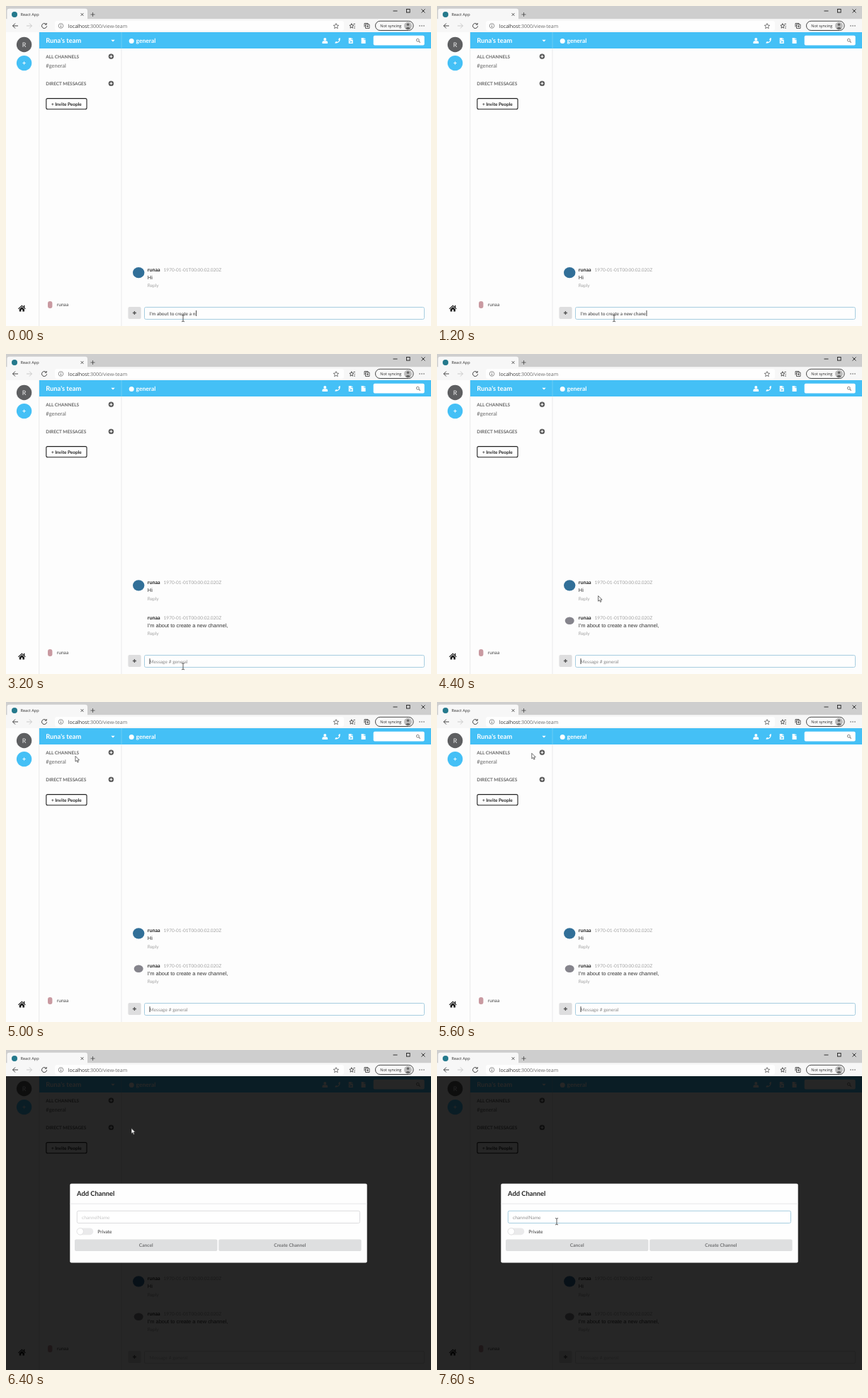
Animation of 600x452 px, one loop 8 s. Source, as an HTML page with a canvas:

```html
<!DOCTYPE html>
<html lang="en">
<head>
<meta charset="utf-8">
<title>Team chat</title>
<style>
html, body { margin: 0; width: 100%; height: 100%; overflow: hidden; background: #fdfdfd; }
canvas { display: block; width: 600px; height: 452px; }
</style>
</head>
<body>
<canvas id="stage" width="600" height="452"></canvas>
<script>
const ctx = document.getElementById('stage').getContext('2d');
const LOOP = 8000, STEP = 200;
const LATO = 'Lato, sans-serif';
const UI = '"Open Sans", "Noto Sans", sans-serif';
const ARIAL = '"Liberation Sans", Arial, sans-serif';
const BLUE = '#44c0f6', INK = '#222', MUTED = '#a3a3a3', FOCUS = '#a6cde0', EDGE = '#dcdcde';
const TOP = 37;
const USER = 'runaa';

// [time, text typed after BASE]; a slip at 1200 is then deleted
const BASE = "I'm about to create a n";
const typing = [
  [0, ''], [200, 'e'], [400, 'ew'], [600, 'ew c'], [800, 'ew ch'], [1000, 'ew chan'],
  [1200, 'ew chane'], [1400, 'ew chan'], [1600, 'ew chann'], [1800, 'ew channe'],
  [2000, 'ew channel'], [2600, 'ew channel,']
];
// [time, x, y, shape]
const pointer = [
  [0, 250, 441, 'beam'], [4400, 227.6, 341.6], [4600, 192, 250], [4800, 135, 140], [5000, 98, 76.5],
  [5400, 116, 75], [5600, 133.8, 72.4], [5800, 142, 70], [6000, 147, 68], [6400, 177, 110.6],
  [6600, 177, 142], [6800, 174, 190], [7000, 171, 238, 'beam'], [7200, 169, 242, 'beam']
];

const at = (keys, t) => keys.filter(k => k[0] <= t).pop();
const within = (t, a, b) => t >= a && t < b;

function text(str, x, cy, size, color, { bold = false, font = LATO, align = 'left' } = {}) {
  ctx.font = `${bold ? 'bold ' : ''}${size}px ${font}`;
  ctx.textRendering = 'geometricPrecision';
  ctx.fillStyle = color;
  ctx.textAlign = align;
  ctx.fillText(str, x, cy + size * 0.36);
  return ctx.measureText(str).width;
}
function rect(x, y, w, h, color) {
  ctx.fillStyle = color;
  ctx.fillRect(x, y, w, h);
}
function box(x, y, w, h, r, fill, stroke, lw = 1) {
  ctx.beginPath();
  ctx.roundRect(x, y, w, h, r);
  paint(fill, stroke, lw);
}
function disc(x, y, r, fill, stroke, lw = 1) {
  oval(x, y, r, r, fill, stroke, lw);
}
function oval(x, y, rx, ry, fill, stroke, lw) {
  ctx.beginPath();
  ctx.ellipse(x, y, rx, ry, 0, 0, Math.PI * 2);
  paint(fill, stroke, lw);
}
function paint(fill, stroke, lw) {
  if (fill) { ctx.fillStyle = fill; ctx.fill(); }
  if (stroke) { ctx.strokeStyle = stroke; ctx.lineWidth = lw; ctx.stroke(); }
}
function path(d, x, y, fill, stroke, lw = 1) {
  const p = new Path2D(d);
  ctx.save();
  ctx.translate(x, y);
  if (fill) { ctx.fillStyle = fill; ctx.fill(p); }
  if (stroke) { ctx.strokeStyle = stroke; ctx.lineWidth = lw; ctx.stroke(p); }
  ctx.restore();
}
const plus = (x, y, r, color, lw) => path(`M${-r} 0H${r}M0 ${-r}V${r}`, x, y, null, color, lw);
const cross = (x, y, r, color, lw) => path(`M${-r} ${-r}L${r} ${r}M${r} ${-r}L${-r} ${r}`, x, y, null, color, lw);

function drawBrowser() {
  rect(0, 0, 600, 18.5, '#cecece');
  box(1.5, 3.8, 113.5, 16, [3, 3, 0, 0], '#f7f7f7');
  rect(0, 18.5, 600, TOP - 18.5, '#f7f7f7');
  disc(12, 12, 4, '#24798c');
  text('React App', 20.5, 12, 5.6, '#333', { font: UI });
  cross(107.5, 12, 1.9, '#333', 0.8);
  plus(122.5, 12, 3, '#444', 0.8);
  path('M-3 0H3', 549.5, 7, null, '#222', 0.9);
  ctx.strokeStyle = '#222';
  ctx.lineWidth = 0.9;
  ctx.strokeRect(565.5, 4.5, 4.6, 4.6);
  cross(589, 7, 2.5, '#222', 0.9);

  path('M4 0H-3.5M0 -3.5L-3.5 0L0 3.5', 13, 28, null, '#333', 0.9);
  path('M-4 0H3.5M0 -3.5L3.5 0L0 3.5', 33, 28, null, '#c4c4c4', 0.9);
  path('M2.6 -2.3A3.5 3.5 0 1 0 3.5 .3M3.2 -4V-1.8H.8', 54, 28, null, '#333', 0.9);
  box(69, 21, 408, 14, 3, '#fefefe');
  disc(77.5, 28, 3.3, null, '#666', 0.7);
  path('M0 -.4V2M0 -1.9V-1.1', 77.5, 28, null, '#555', 0.8);
  const w = text('localhost', 87.8, 28.2, 7, '#333', { font: UI });
  text(':3000/view-team', 87.8 + w, 28.2, 7, '#6c6c6c', { font: UI });

  const star = 'M0 -3.7L1.1 -1.2L3.7 -1L1.7 .8L2.3 3.4L0 2L-2.3 3.4L-1.7 .8L-3.7 -1L-1.1 -1.2Z';
  path(star, 466, 28.3, null, '#444', 0.7);
  path('M-1.2 -3.5L-.3 -1.2L2 -1L0 .8L.5 3L-1.2 1.8L-3 3L-2.5 .8L-4 -1L-2 -1.2ZM1.5 -2.8H4M2.6 .2H4M2 2.8H4', 489, 28.2, null, '#333', 0.8);
  path('M-3.5 1.5V-3.5H1.5V-2M-2 -2H3.5V3.5H-2ZM-.7 .7H2.3M.8 -.8V2.2', 509.5, 28, null, '#333', 0.8);
  box(521.5, 21.3, 53.6, 13.2, 6.6, '#f9f9f9', '#333', 0.9);
  text('Not syncing', 528.3, 28, 5.5, '#222', { font: UI });
  disc(567.5, 28, 5.5, '#bcbcbc');
  disc(567.5, 26.3, 1.8, '#666');
  path('M-3.4 3.3Q0 -1 3.4 3.3Q0 6 -3.4 3.3Z', 567.5, 28.5, '#666');
  for (const x of [584, 587, 590]) disc(x, 28, 0.65, '#333');
}

function drawHeader() {
  rect(47, TOP, 553, 60 - TOP, BLUE);
  rect(162.6, TOP, 0.8, 60 - TOP, '#74cff5');
  text("Runa's team", 56.3, 49, 9.3, '#fff', { bold: true });
  path('M-2.7 -1.3H2.7L0 1.6Z', 151, 49, '#fff');
  disc(177.2, 49.5, 3.5, '#fff');
  text('general', 183.5, 49, 8.5, '#fff', { bold: true });

  disc(450.3, 47, 2, '#fff');
  path('M-3.8 4V2Q-3.8 .2 -1.8 .2H1.8Q3.8 .2 3.8 2V4Z', 450.3, 49, '#fff');
  path('M3.7 -3.7L1.7 -3.4L.9 -1.3L2 -.4Q1.2 1.2 -.4 2L-1.3 .9L-3.4 1.7L-3.8 3.8Q3.5 3.8 3.7 -3.7Z', 468.3, 49, '#fff');
  const page = 'M-3 -4H.8V-1.2H3V4H-3ZM1.4 -4L3 -1.9H1.4Z';
  path(page, 486.8, 49, '#fff');
  disc(485.5, 48.6, 0.7, BLUE);
  path('M-2 2.6L-.7 .8L.1 1.5L1 .2L2 2.6Z', 486.8, 49, BLUE);
  path(page, 504.6, 49, '#fff');
  box(518.7, 41.8, 72, 13.8, 2, '#fff');
  disc(581.3, 48.2, 1.9, null, '#777', 0.9);
  path('M0 0L2 2', 582.7, 49.7, null, '#777', 1.1);
}

function drawSidebar() {
  rect(46.4, TOP, 0.8, 415, '#e3e3e5');
  rect(162.6, 60, 0.8, 392, '#e3e3e5');
  disc(25.6, 54.5, 10.7, '#5e5f61');
  text('R', 25.6, 54.5, 9, '#eee', { align: 'center' });
  disc(25.6, 80.6, 10.7, BLUE);
  plus(25.6, 80.6, 2.2, '#fff', 0.9);

  text('ALL CHANNELS', 56.3, 72, 6.45, '#666', { bold: true });
  text('#general', 56.3, 84.2, 7.5, '#666');
  text('DIRECT MESSAGES', 56.3, 110, 6.45, '#666', { bold: true });
  for (const y of [71.3, 109.4]) {
    disc(148.4, y, 3.7, '#5c5c5c');
    plus(148.4, y, 2, '#fff', 1);
  }
  box(56.8, 130.6, 57.2, 15.2, 2, '#fefefe', '#222', 1.1);
  text('+ Invite People', 85.3, 138.4, 6.45, '#222', { bold: true, align: 'center' });

  path('M-5.4 .4L0 -4.6L5.4 .4L4.6 1.3L0 -2.9L-4.6 1.3ZM-3.6 1.2L0 -2.1L3.6 1.2V4.5H1V1.8H-1V4.5H-3.6ZM2.6 -4.2H3.9V-.8L2.6 -2Z', 22.4, 427, '#1a1a1a');
  box(59, 417, 6.4, 10, 3, '#c99aa1');
  text(USER, 71.8, 422, 6.65, '#444');
}

function drawMessage(y, body, avatar) {
  if (avatar) oval(187.2, y + 4, avatar.rx, avatar.ry, avatar.color);
  text(USER, 199.8, y, 7.1, INK, { bold: true });
  text('1970-01-01T00:00:02.020Z', 222.6, y, 6.5, MUTED);
  text(body, 199.8, y + 10.2, 7.45, '#333', { font: ARIAL });
  text('Reply', 199.8, y + 22.4, 6.5, MUTED);
}

function drawChat(t) {
  const portrait = { rx: 8.2, ry: 7.6, color: '#316f98' };
  if (t < 3000) {
    drawMessage(372.7, 'Hi', portrait);
    return;
  }
  drawMessage(322.8, 'Hi', t >= 3200 && portrait);
  drawMessage(372.7, BASE + 'ew channel,', t >= 3400 && { rx: 6.5, ry: 5.2, color: '#85848c' });
}

function drawComposer(t) {
  const focused = t < 6000;
  box(172.4, 425, 18.2, 17, 2, '#dededf');
  plus(181.4, 433.5, 2.5, '#555', 1.4);
  box(195.5, 425.5, 395, 17, 2, '#fefefe', focused ? FOCUS : EDGE);
  let x = 202.6;
  if (t < 3000) x += text(BASE + at(typing, t)[1], x, 434.3, 6.6, '#333') + 0.7;
  else text('Message # general', x, 434.3, 6.6, focused ? '#888' : '#c5c5c5');
  const blinkOff = within(t, 2400, 2600) || within(t, 3600, 3800);
  if (focused && !blinkOff) rect(x, 430, 0.8, 8, '#222');
}

function drawDialog(t) {
  rect(0, TOP, 600, 452 - TOP, 'rgba(0,0,0,.85)');
  box(90.3, 188.8, 419.4, 111.8, 2, '#fefefe');
  text('Add Channel', 100, 203, 9.35, '#222', { bold: true });
  rect(90.3, 216.7, 419.4, 0.8, '#e2e2e4');

  const focused = t >= 7200;
  const border = t >= 7400 ? FOCUS : focused ? '#c2d6e0' : EDGE;
  box(100.3, 227.3, 399.2, 17.2, 2, '#fff', border);
  text('channelName', 107, 236.2, 6.6, focused ? '#929292' : '#c8c8c8');
  if (within(t, 7200, 7600)) rect(106.6, 232, 0.8, 8, '#222');

  box(99.8, 251.4, 23.4, 9.8, 4.9, '#eaeaeb');
  disc(104.7, 256.3, 4.7, '#fff', '#d8d8d9', 0.7);
  text('Private', 129.3, 256.3, 6.6, '#333');
  [['Cancel', 97], ['Create Channel', 300.2]].forEach(([label, x]) => {
    box(x, 267.4, 201.4, 16.6, 2, '#dedfe0');
    text(label, x + 100.7, 275.8, 6.6, '#717273', { bold: true, align: 'center' });
  });
}

function drawPointer(t) {
  const [, x, y, shape] = at(pointer, t);
  if (shape) {
    path('M-2 -4.4Q0 -4.4 0 -3.4Q0 -4.4 2 -4.4M0 -3.4V3.8M-2 4.8Q0 4.8 0 3.8Q0 4.8 2 4.8', x, y, null, '#333', 0.8);
  } else {
    path('M0 0V7.6L1.8 6L3 8.8L4.3 8.2L3.1 5.5H5.5Z', x, y, '#fff', '#333', 0.7);
  }
}

function draw(t) {
  rect(0, 0, 600, 452, '#fdfdfd');
  drawSidebar();
  drawHeader();
  drawChat(t);
  drawComposer(t);
  if (t >= 6400) drawDialog(t);
  drawBrowser();
  drawPointer(t);
}

function tick() {
  const t = performance.now() % LOOP;
  draw(Math.floor(t / STEP) * STEP);
  requestAnimationFrame(tick);
}
tick();
</script>
</body>
</html>
```
